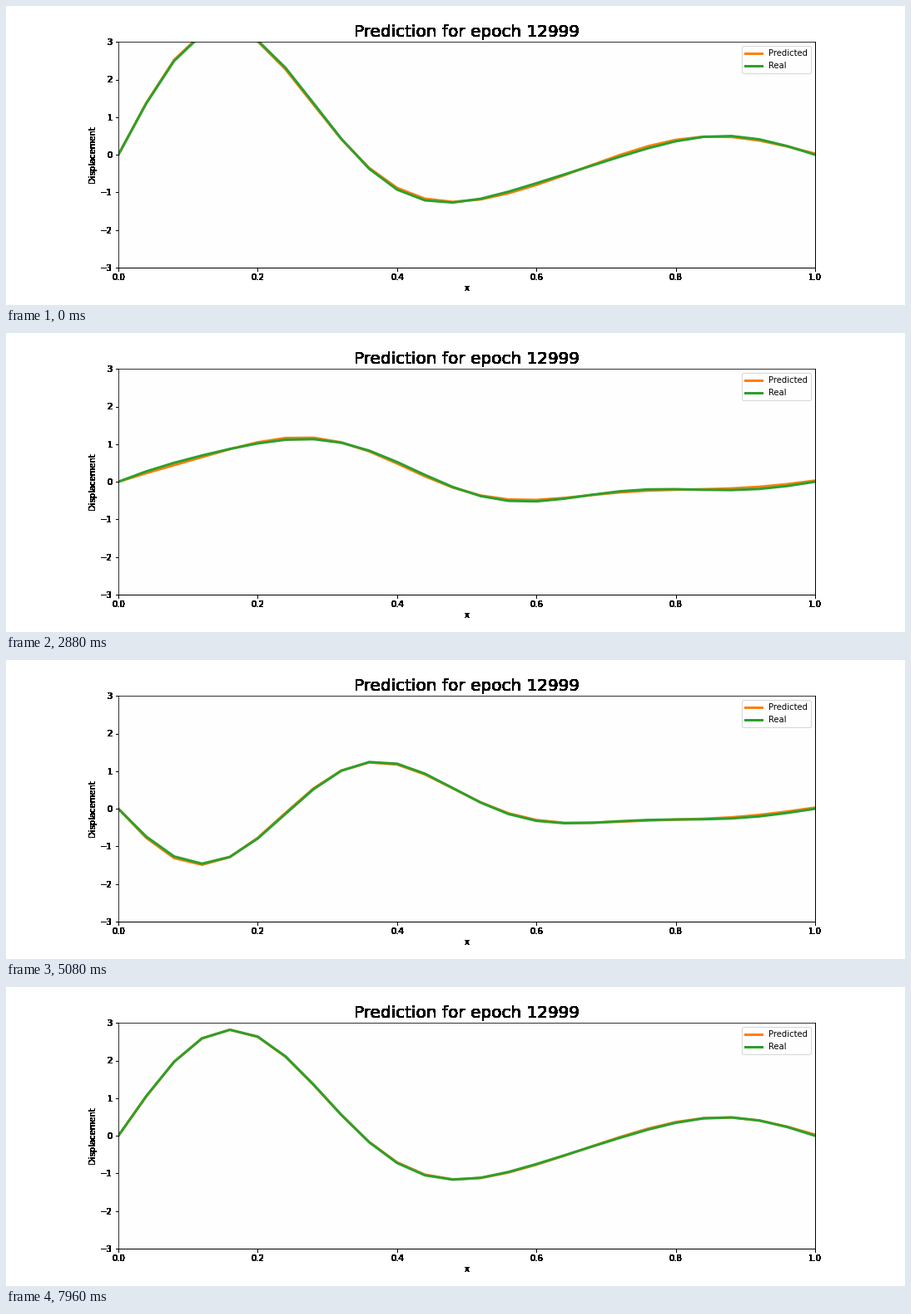
Recreate the animation shown at these times as a matplotlib script. Size 1080 by 360 pixels, loop 8 s.

```python
import numpy as np
import matplotlib.pyplot as plt
from matplotlib.animation import FuncAnimation

FRAMES, INTERVAL = 200, 40
DPI = 72

# Axially moving string: harmonics of one period with a phase that drifts along x
AMPLITUDES = [0.165, 0.987, 1.70, 0.70, 0.30]
SPEED = 0.05
OMEGA = np.pi * (1 - SPEED**2)
DT, FIRST_STEP = 0.03, 66

x = np.linspace(0, 1, 26)


def real(step):
    phase = OMEGA * DT * (FIRST_STEP + step) + np.pi * SPEED * x
    return sum(a * np.sin(n * np.pi * x) * np.cos(n * phase)
               for n, a in enumerate(AMPLITUDES, 1))


def error(step):
    """Slowly changing ripple, with a dip at the left and a lift at the right."""
    ripple = np.interp(step, [0, 41, 107, 147, 175, 199],
                       [0.05, -0.02, -0.06, 0.02, -0.02, 0.02])
    dip = 0.04 * np.exp(-x / 0.15)
    return (ripple - dip) * np.sin(6 * np.pi * x) + 0.03 * x**6


plt.rcParams.update({"font.family": "DejaVu Sans", "font.size": 10})
fig = plt.figure(figsize=(1080 / DPI, 360 / DPI), dpi=DPI, facecolor="white")
ax = fig.add_axes([0.125, 0.125, 0.775, 0.755])
ax.set(xlim=(0, 1), ylim=(-3, 3), ylabel="Displacement")
ax.set_xlabel("x", labelpad=3)
ax.set_title("Prediction for epoch 12999", fontsize=20)

# Text and ticks look overprinted many times, which hardens their soft edges
fig.canvas.draw()
decor = np.asarray(fig.canvas.buffer_rgba())[..., :3] / 255
fig.figimage(decor**64, zorder=-1)

ax.set(title="", xlabel="", ylabel="", facecolor="#fefefe")
ax.tick_params(bottom=False, left=False, labelbottom=False, labelleft=False)

predicted_line, = ax.plot(x, real(0) + error(0), color="tab:orange", lw=3,
                          label="Predicted")
real_line, = ax.plot(x, real(0), color="tab:green", lw=3, label="Real")
ax.legend(loc="upper right")


def update(step):
    u = real(step)
    predicted_line.set_ydata(u + error(step))
    real_line.set_ydata(u)
    return predicted_line, real_line


anim = FuncAnimation(fig, update, frames=FRAMES, interval=INTERVAL,
                     repeat=True, repeat_delay=0)
plt.show()
```
